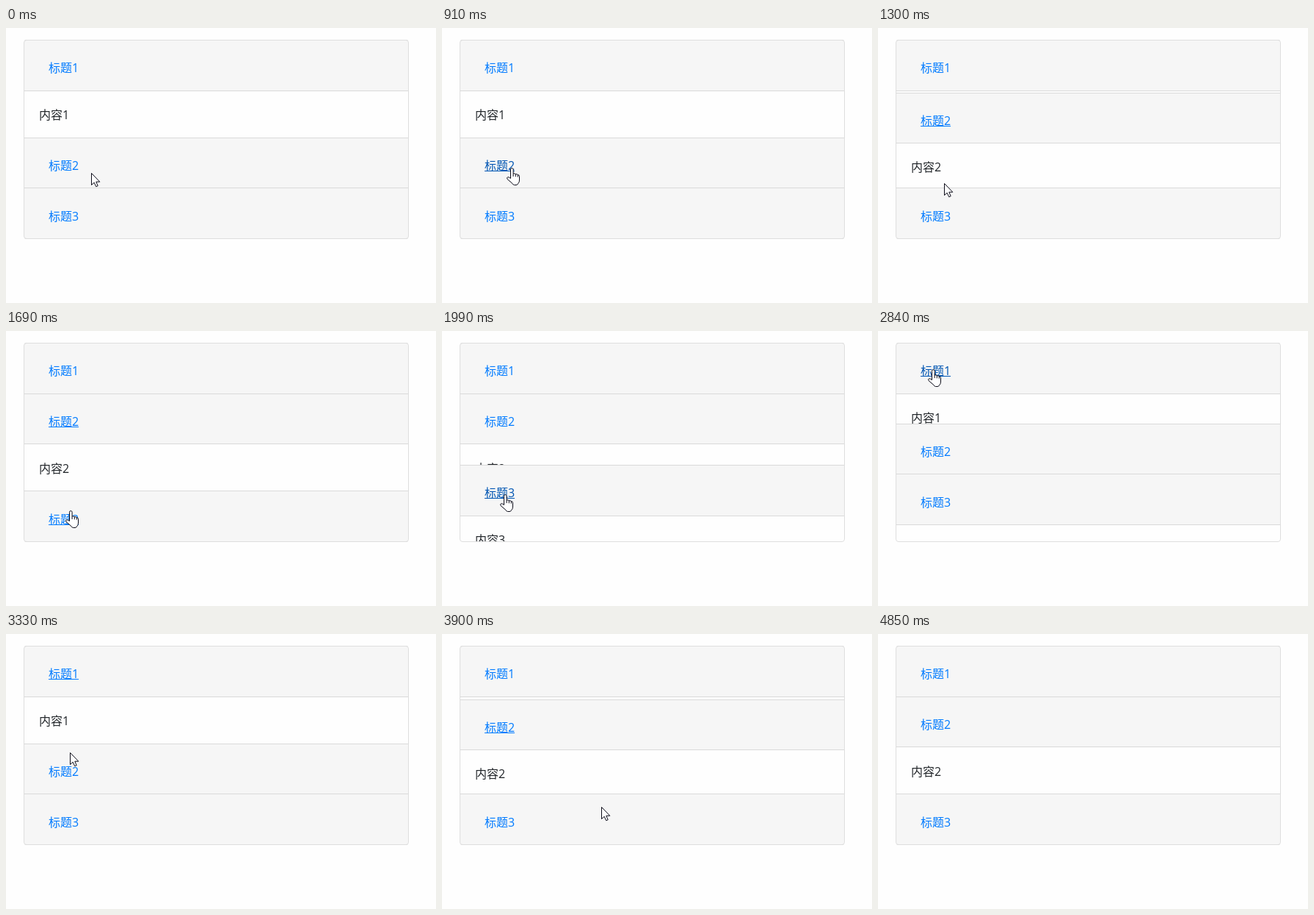
These frames come from a looping animation (586 by 374 pixels, 4.95 s). An HTML page:

```html
<!DOCTYPE html>
<html lang="zh">
<head>
<meta charset="utf-8">
<title>Accordion</title>
<style>
  html, body { margin: 0; width: 100%; height: 100%; overflow: hidden; background: #fefefe; }
  svg { display: block; font: 16px "Open Sans", "Noto Sans CJK SC", "Noto Sans CJK", sans-serif; }
</style>
</head>
<body>
<svg width="586" height="374" viewBox="0 0 586 374">
  <clipPath id="card"><rect x="24" y="16" width="525" height="271" rx="4"/></clipPath>
  <g id="panels" clip-path="url(#card)"></g>
  <rect x="24.5" y="16.5" width="524" height="270" rx="3.5" fill="none" stroke="#dedede"/>
  <path id="cursor" fill="#fff" stroke="#0b0b18" stroke-linejoin="round"/>
</svg>
<script>
const LOOP = 4950, SLIDE = 350, HEADER = 68.52, BODY = 64;
// The screen refreshes at a steady pace after a first pause
const PAUSE = 750, REFRESH = 135.7;
const ARROW = 'M.5 .5V16.5L4.2 13.2 6.7 18.7 9.2 17.7 6.8 12.2H11.8Z';
const HAND = 'M5.5 14.5V2.4a1.8 1.8 0 0 1 3.6 0V8q2-.8 3.2.8 2-.6 3 .9 2.2-.2 2.2 2V17q0 3-1.8 4.5-.7 2-2.7 2H10.5q-1.5 0-2.5-2L1 15.5Q0 13.5 1.5 12.8 3 12.3 5.5 14.5ZM9.1 8v4M12.3 8.8v3.5M15.3 9.7v3';

// Pointer path: refresh count, x, y
const path = [
  [-1, 116, 197], [0, 99, 190], [2, 88, 190], [4, 90, 211],
  [7, 85, 260], [8, 85, 261], [9, 85, 222], [11, 78, 77],
  [15, 74, 52], [17, 75, 55], [19, 87, 161], [20, 84, 174],
  [21, 86, 175], [23, 217, 235], [24, 359, 328], [25, 600, 400]
];
// Click time, panel to open; the button goes down a little earlier
const clicks = [[1037, 1], [1860, 2], [2655, 0], [3628, 1]];
const PRESS = 30, BLUR = 4800;

// CSS "ease" timing
function ease(x) {
  if (x <= 0) return 0;
  if (x >= 1) return 1;
  let lo = 0, hi = 1, u;
  for (let i = 0; i < 30; i++) {
    u = (lo + hi) / 2;
    if (.75 * u * (1 - u) + u ** 3 < x) lo = u; else hi = u;
  }
  return .3 * u * (1 - u) ** 2 + 3 * u * u * (1 - u) + u ** 3;
}

const timeOf = n => n < 0 ? 0 : PAUSE + n * REFRESH;

function pointer(n) {
  const i = path.findIndex(p => p[0] >= n);
  if (i < 1) return path.at(i).slice(1);
  const [from, to] = [path[i - 1], path[i]];
  const k = (n - from[0]) / (to[0] - from[0]);
  return [1, 2].map(c => Math.round(from[c] + (to[c] - from[c]) * k));
}

function layout(t) {
  let open = [1, 0, 0];
  for (const [start, panel] of clicks) {
    const p = ease((t - start) / SLIDE);
    open = open.map((v, i) => v + ((i === panel) - v) * p);
  }
  let y = 16.55;
  return open.map(v => {
    const top = y;
    y += HEADER + v * BODY;
    return top;
  });
}

function hovered(n) {
  const [x, y] = pointer(n);
  return layout(timeOf(n)).findIndex(top => x > 45 && x < 112 && y > top + 19 && y < top + 57);
}

const bar = (x, y, w, h, fill) => `<rect x="${x}" y="${y}" width="${w}" height="${h}" fill="${fill}"/>`;
const label = (x, y, fill, text) => `<text x="${x}" y="${y}" fill="${fill}">${text}</text>`;

function panel(top, i, hover, dark, focus) {
  const y = Math.floor(top), end = Math.floor(top + HEADER);
  const base = Math.floor(top + 44.43), color = dark === i ? '#0056b3' : '#007bff';
  return bar(25, y, 523, end - y, '#f6f6f6') +
    bar(25, y, 523, 1, '#dadada') +
    bar(25, end, 523, BODY + 8, '#fefefe') +
    bar(25, end, 523, 1, '#dadada') +
    label(58, base, color, '标题' + (i + 1)) +
    (hover === i || focus === i ? bar(58, base + 1, 41, 1, color) : '') +
    label(45, Math.floor(top + HEADER + 39.42), '#212529', '内容' + (i + 1));
}

const panels = document.getElementById('panels');
const cursor = document.getElementById('cursor');
let shown;

function draw(n) {
  const t = timeOf(n), [x, y] = pointer(n), hover = hovered(n);
  // The link colour lags one refresh behind the underline
  const dark = hovered(n - 1) === hover ? hover : -1;
  const click = clicks.filter(c => c[0] - PRESS <= t).pop();
  const focus = click && t < BLUR ? click[1] : -1;
  panels.innerHTML = layout(t).map((top, i) => panel(top, i, hover, dark, focus)).join('');
  const hand = hover >= 0;
  cursor.setAttribute('d', hand ? HAND : ARROW);
  cursor.setAttribute('transform', `translate(${hand ? x - 6 : x} ${y})`);
}

const begin = performance.now();
function tick() {
  const t = (performance.now() - begin) % LOOP;
  const n = Math.max(-1, Math.floor((t - PAUSE) / REFRESH));
  if (n !== shown) draw(shown = n);
  requestAnimationFrame(tick);
}
tick();
</script>
</body>
</html>
```
